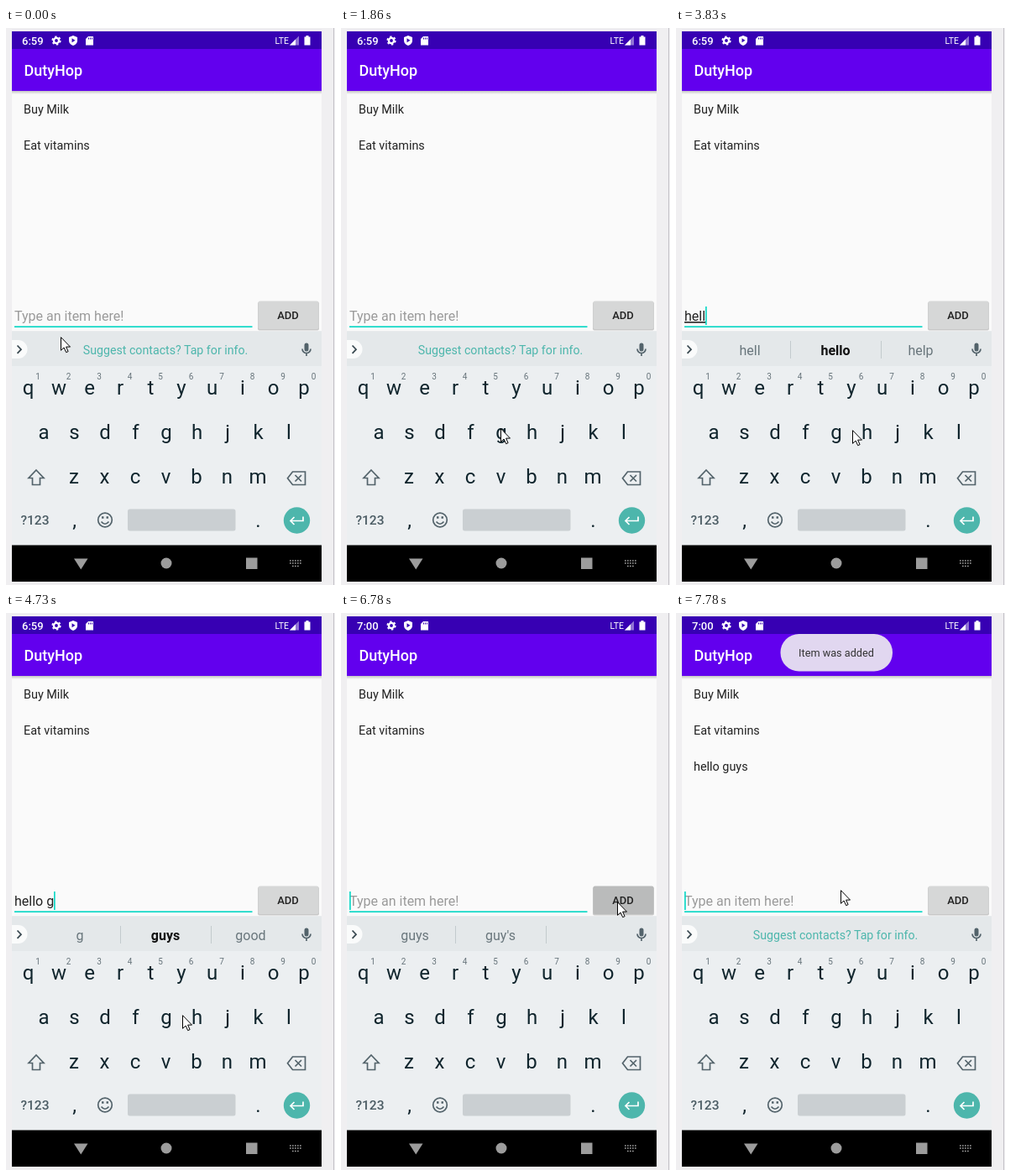
Animation, 392 px wide and 664 px high, one loop 8 s. Source, as an HTML page:

```html
<!DOCTYPE html>
<html lang="en">
<head>
<meta charset="utf-8">
<title>Adding a list item</title>
<style>
  html, body { margin: 0; width: 100%; height: 100%; overflow: hidden; background: #f0eff1; }
  svg { display: block; width: 100vw; height: 100vh; font-family: Roboto, sans-serif; }
  .mid { text-anchor: middle; }
  .medium { font-weight: 500; }
  .item { font-size: 14.4px; fill: #222; }
  .field { font-size: 16px; white-space: pre; }
  .key { font-size: 24px; fill: #10252d; text-anchor: middle; }
  .digit { font-size: 10px; fill: #66737a; text-anchor: middle; }
  .chip { font-size: 16px; fill: #69767c; text-anchor: middle; }
  .line { fill: none; stroke: #53636b; stroke-width: 1.7; }
  #composing { text-decoration: underline; text-decoration-skip-ink: none; }
</style>
</head>
<body>
<svg viewBox="0 0 392 664">
  <defs>
    <linearGradient id="shade" x2="0" y2="1">
      <stop stop-color="#000" stop-opacity=".22"/>
      <stop offset="1" stop-color="#000" stop-opacity="0"/>
    </linearGradient>
  </defs>
  <rect width="392" height="664" fill="#f0eff1"/>
  <rect x="390" width="1" height="664" fill="#c4c2c8"/>
  <rect x="7" y="4" width="369" height="21" fill="#3700b3"/>
  <rect x="7" y="25" width="369" height="50" fill="#6200ee"/>
  <rect x="7" y="75" width="369" height="286" fill="#fafafa"/>
  <rect x="7" y="75" width="369" height="4" fill="url(#shade)"/>

  <!-- Status bar -->
  <g fill="#fff">
    <text id="clock" class="medium" x="19" y="19.5" font-size="13"></text>
    <circle cx="60" cy="15" r="3.1" fill="none" stroke="#fff" stroke-width="2.4"/>
    <circle cx="60" cy="15" r="4.8" fill="none" stroke="#fff" stroke-width="1.6" stroke-dasharray="2.5 2.53"/>
    <path d="M80 9l5 2v4q0 4-5 6-5-2-5-6v-4z"/>
    <path d="M78.5 12.3v5l4-2.5z" fill="#3700b3"/>
    <path d="M98 10h6v10.500h-9v-7.500z"/>
    <path d="M98.500 11.500v2M100.500 11.500v2M102.500 11.500v2" stroke="#3700b3"/>
    <text x="320.500" y="18.500" font-size="10.500">LTE</text>
    <path d="M338 20.500h11v-11z" opacity=".45"/>
    <path d="M338 20.500h7v-7z"/>
    <path d="M355.500 10.500h2v-1.500h3v1.500h2v10h-7z"/>
  </g>
  <text class="medium" x="21.500" y="57" font-size="18" fill="#fff">DutyHop</text>

  <!-- List and input -->
  <text class="item" x="21" y="102">Buy Milk</text>
  <text class="item" x="21" y="145">Eat vitamins</text>
  <text class="item" x="21" y="188" id="added">hello guys</text>
  <text id="hint" class="field" x="10" y="349" fill="#9a9a9a">Type an item here!</text>
  <text id="typed" class="field" x="10" y="349" fill="#222" xml:space="preserve"><tspan id="done"></tspan><tspan id="composing"></tspan></text>
  <rect x="10" y="355.300" width="283.500" height="1.700" fill="#10d8c6"/>
  <rect id="caret" y="332" width="1.700" height="22" fill="#10d8c6"/>
  <rect x="300" y="326.500" width="73" height="34" rx="2" fill="#000" opacity=".2"/>
  <rect id="button" x="300.500" y="325.500" width="72" height="33.500" rx="2"/>
  <text class="mid medium" x="336" y="347" font-size="13" fill="#222">ADD</text>

  <!-- Suggestion strip -->
  <rect x="7" y="361.500" width="369" height="41.500" fill="#e4e8ea"/>
  <path d="M7 372h7.500a11 11 0 0 1 0 22h-7.500z" fill="#fafbfb"/>
  <path class="line" d="M13.500 378.500l4.500 4.700-4.500 4.700" style="stroke:#37474f"/>
  <text id="offer" class="mid" x="190" y="389" font-size="14.200" fill="#4db6ac">Suggest contacts? Tap for info.</text>
  <g id="chips">
    <path d="M136.500 373v21M244.500 373v21" stroke="#c3cacd"/>
    <text class="chip" x="88" y="389.500"></text>
    <text class="chip" x="190" y="389.500"></text>
    <text class="chip" x="291.500" y="389.500"></text>
  </g>
  <rect x="355.500" y="375.500" width="5" height="10" rx="2.500" fill="#53636b"/>
  <path class="line" d="M353 382.500a5 5 0 0 0 10 0M358 387.500v3.500"/>

  <!-- Keyboard -->
  <rect x="7" y="403" width="369" height="213.500" fill="#eceff1"/>
  <g id="keys"></g>
  <path class="line" d="M36 527l9 9.500h-4.500v8h-9v-8h-4.500z"/>
  <path class="line" d="M341.500 529h15v15.500h-15l-6-7.750zM344.500 533l7.500 7.500M352 533l-7.500 7.500"/>
  <text class="medium" x="17.500" y="592" font-size="15.500" fill="#4a5b63">?123</text>
  <circle class="line" cx="118" cy="586.500" r="8.300"/>
  <path class="line" d="M113.500 588.500q4.500 5.500 9 0"/>
  <path d="M114 583.500h2.500M119.500 583.500h2.500" stroke="#53636b" stroke-width="2.500"/>
  <rect x="145" y="573.500" width="128.500" height="26" rx="2.500" fill="#cacfd2"/>
  <circle cx="346.500" cy="587" r="15.700" fill="#4db6ac"/>
  <path class="line" d="M354 582.500v5h-15M343.500 583l-4.500 4.500 4.500 4.500" style="stroke:#fff"/>

  <!-- Navigation bar -->
  <rect x="7" y="616.500" width="369" height="43.500"/>
  <g fill="#9c9c9c">
    <path d="M81 632.500h16.500l-8.250 13z"/>
    <circle cx="191" cy="638" r="6.500"/>
    <rect x="286" y="631.500" width="13.500" height="13.500"/>
    <path d="M338 635h14M338 638h14M341 641.500h8" fill="none" stroke="#9c9c9c" stroke-width="1.700" stroke-dasharray="1.700 1.300"/>
  </g>

  <g id="toast">
    <rect x="124.500" y="25" width="133.500" height="44.500" rx="22" fill="#e1d7f0"/>
    <text class="mid" x="191" y="52" font-size="12.700" fill="#333">Item was added</text>
  </g>
  <path id="mouse" d="M.5.700v15.600l3.600-3.300 2.600 5.700 2.400-1.100-2.500-5.500h4.900z" fill="#fff" stroke="#000"/>
</svg>
<script>
const LOOP = 8000;
const $ = id => document.getElementById(id);

// Each track is a list of [start time, ...values]; values hold until the next entry.
const mouseTrack = [
  [0, 65, 368], [930, 69, 360], [1080, 70, 348], [1200, 71, 340],
  [1320, 74, 324], [1440, 82, 348], [1560, 100, 382], [1710, 152, 458],
  [1860, 190, 477], [1980, 220, 484], [2100, 232, 482], [2350, 210, 479],
  [5740, 331, 392], [5860, 336, 344], [6140, 341, 342], [6260, 329, 344],
  [7050, 332, 344], [7200, 338, 342], [7350, 332, 340], [7500, 196, 330]
];
const textTrack = [
  [0, "", ""], [2900, "", "h"], [3180, "", "he"], [3710, "", "hel"], [3830, "", "hell"],
  [4140, "", "hello"], [4420, "hello ", ""], [4730, "hello ", "g"], [4850, "hello ", "gu"],
  [5130, "hello ", "guy"], [5280, "hello ", "guys"], [6780, "", ""]
];
const chipTrack = [
  [0], [3710, "hel", "hello", "help"], [3830, "hell", "hello", "help"],
  [4140, "hello", "hellos", "hello's"], [4420, "I", "and", "there"],
  [4730, "g", "guys", "good"], [4850, "gu", "guys", "guess"],
  [5130, "guy", "guys", "guy's"], [5280, "guys", "guy's", ""], [7050]
];
const boldTimes = [3710, 3830, 4730, 4850];
const caretTrack = [
  [0, 0], [280, 1], [810, 0], [1320, 1], [1560, 0], [2350, 1], [2780, 0], [2900, 1],
  [5860, 0], [6260, 1], [6660, 0], [6780, 1], [7350, 0], [7780, 1]
];
const toastTrack = [[0, 0], [7050, .4], [7200, .8], [7350, 1]];

const at = (track, time) => track.findLast(entry => entry[0] <= time);
const show = (id, visible) => $(id).setAttribute("visibility", visible ? "visible" : "hidden");

function buildKeys() {
  const label = (kind, x, y, char) => `<text class="${kind}" x="${x}" y="${y}">${char}</text>`;
  const row = (chars, x, y) => [...chars].map((c, i) => label("key", x + i * 36.5, y, c)).join("");
  const digits = [..."1234567890"].map((c, i) => label("digit", 38 + i * 36.5, 419, c)).join("");
  $("keys").innerHTML = row("qwertyuiop", 26.5, 437) + digits + row("asdfghjkl", 45, 490) +
    row("zxcvbnm", 81, 543) + label("key", 81.5, 595, ",") + label("key", 300.5, 595, ".");
}

function render(time) {
  const [, x, y] = at(mouseTrack, time);
  $("mouse").setAttribute("transform", `translate(${x} ${y})`);
  $("clock").textContent = time < 6140 ? "6:59" : "7:00";

  const [, done, composing] = at(textTrack, time);
  $("done").textContent = done;
  $("composing").textContent = composing;
  show("hint", !(done + composing));
  $("caret").setAttribute("x", 10 + Math.round($("typed").getComputedTextLength()));
  show("caret", at(caretTrack, time)[1]);

  const [chipTime, ...words] = at(chipTrack, time);
  show("offer", !words.length);
  show("chips", words.length);
  document.querySelectorAll(".chip").forEach((chip, i) => {
    const bold = i === 1 && boldTimes.includes(chipTime);
    chip.textContent = words[i] || "";
    chip.style.fontWeight = bold ? 700 : 400;
    chip.style.fill = bold ? "#111" : "";
  });

  $("button").setAttribute("fill", time >= 6660 && time < 6930 ? "#babbbb" : "#d6d7d7");
  show("added", time >= 6930);
  $("toast").setAttribute("opacity", at(toastTrack, time)[1]);
}

function tick(now) {
  render(now % LOOP);
  requestAnimationFrame(tick);
}

buildKeys();
render(0);
requestAnimationFrame(tick);
</script>
</body>
</html>
```
